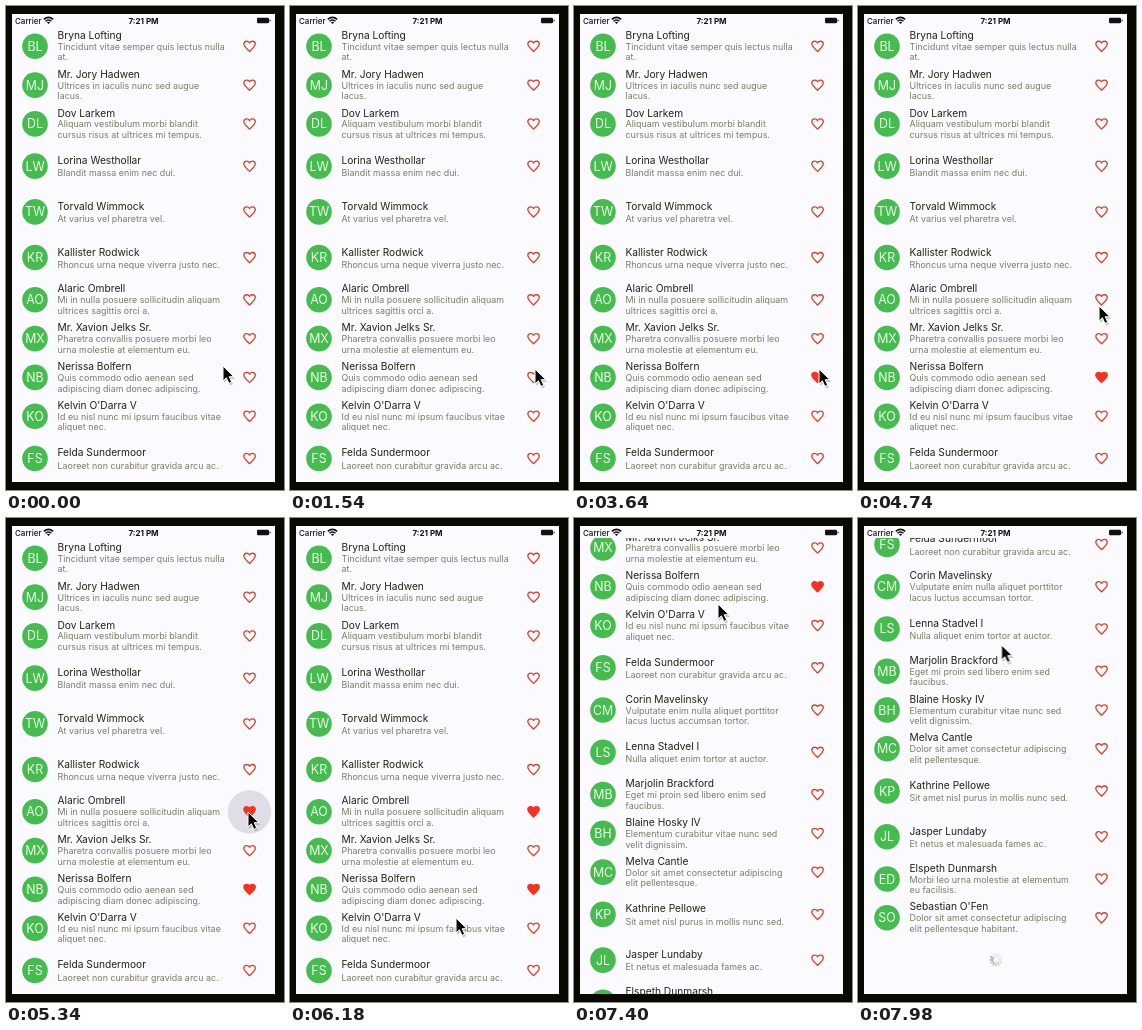
Animation, 278 px wide and 484 px high, one loop 8000 ms. Source, as an HTML page:

```html
<!DOCTYPE html>
<html lang="en">
<head>
<meta charset="utf-8">
<title>Contact list</title>
<style>
  html, body { margin: 0; width: 100%; height: 100%; overflow: hidden; background: #090902; }
  svg { display: block; width: 278px; height: 484px; font-family: Inter, Roboto, sans-serif; }
  .name { font-size: 10.2px; fill: #22220f; }
  .note { font-size: 8.9px; letter-spacing: .03px; fill: #7b7b62; }
  .initials { font-size: 12.4px; fill: #e8ffe0; text-anchor: middle; }
  .status { font-size: 8px; font-weight: 500; fill: #111; }
  .heart { stroke: #db3d26; stroke-width: 2; stroke-linejoin: round; fill: #fafaff; fill-opacity: 0; }
</style>
</head>
<body>
<svg viewBox="0 0 278 484">
  <defs>
    <clipPath id="view"><rect x="6" y="20" width="263" height="456"/></clipPath>
  </defs>
  <rect width="278" height="484" fill="#090902"/>
  <rect x="6" y="8" width="263" height="468" fill="#fafaff"/>
  <g clip-path="url(#view)"><g id="list"></g></g>
  <text class="status" x="9" y="17.6">Carrier</text>
  <g fill="none" stroke="#111" stroke-width="1.5">
    <path d="M37.8 13.4Q42.5 9.3 47.2 13.4M39.5 15.3Q42.5 12.7 45.5 15.3"/>
    <path d="M40.9 16.4Q42.5 15 44.1 16.4L42.5 18Z" fill="#111" stroke="none"/>
  </g>
  <text class="status" x="137.5" y="17.6" text-anchor="middle" style="font-weight:700">7:21 PM</text>
  <rect x="251" y="11.8" width="12" height="5.4" rx="1.3" fill="#111"/>
  <rect x="263.5" y="13.4" width="1" height="2.2" rx=".5" fill="#111"/>
  <g id="pointer">
    <path d="M1 2V17L4.5 14L7 19.5L10 18L7.5 13H12.3Z" fill="#555533" opacity=".3"/>
    <path d="M0 0V15L3.4 11.8L5.9 17.4L8.7 16.1L6.2 10.7H10.9Z" fill="#080808" stroke="#fff" stroke-width="1"/>
  </g>
</svg>
<script>
const LOOP = 8000, START = document.timeline.currentTime || 0;
const HEART = "M12 20C6.5 15 3 12 3 8.5C3 6 5 4 7.5 4C9.3 4 11.2 5.2 12 6.8" +
  "C12.8 5.2 14.7 4 16.5 4C19 4 21 6 21 8.5C21 12 17.5 15 12 20Z";
const people = [
  ["BL", "Bryna Lofting", "Tincidunt vitae semper quis lectus nulla", "at."],
  ["MJ", "Mr. Jory Hadwen", "Ultrices in iaculis nunc sed augue", "lacus."],
  ["DL", "Dov Larkem", "Aliquam vestibulum morbi blandit", "cursus risus at ultrices mi tempus."],
  ["LW", "Lorina Westhollar", "Blandit massa enim nec dui."],
  ["TW", "Torvald Wimmock", "At varius vel pharetra vel."],
  ["KR", "Kallister Rodwick", "Rhoncus urna neque viverra justo nec."],
  ["AO", "Alaric Ombrell", "Mi in nulla posuere sollicitudin aliquam", "ultrices sagittis orci a."],
  ["MX", "Mr. Xavion Jelks Sr.", "Pharetra convallis posuere morbi leo", "urna molestie at elementum eu."],
  ["NB", "Nerissa Bolfern", "Quis commodo odio aenean sed", "adipiscing diam donec adipiscing."],
  ["KO", "Kelvin O'Darra V", "Id eu nisl nunc mi ipsum faucibus vitae", "aliquet nec."],
  ["FS", "Felda Sundermoor", "Laoreet non curabitur gravida arcu ac."],
  ["CM", "Corin Mavelinsky", "Vulputate enim nulla aliquet porttitor", "lacus luctus accumsan tortor."],
  ["LS", "Lenna Stadvel I", "Nulla aliquet enim tortor at auctor."],
  ["MB", "Marjolin Brackford", "Eget mi proin sed libero enim sed", "faucibus."],
  ["BH", "Blaine Hosky IV", "Elementum curabitur vitae nunc sed", "velit dignissim."],
  ["MC", "Melva Cantle", "Dolor sit amet consectetur adipiscing", "elit pellentesque."],
  ["KP", "Kathrine Pellowe", "Sit amet nisl purus in mollis nunc sed."],
  ["JL", "Jasper Lundaby", "Et netus et malesuada fames ac."],
  ["ED", "Elspeth Dunmarsh", "Morbi leo urna molestie at elementum", "eu facilisis."],
  ["SO", "Sebastian O'Fen", "Dolor sit amet consectetur adipiscing", "elit pellentesque habitant."]
];
const likes = { NB: 3180, AO: 5100 };

function add(parent, tag, attrs, text) {
  const el = document.createElementNS("http://www.w3.org/2000/svg", tag);
  for (const key in attrs) el.setAttribute(key, attrs[key]);
  if (text) el.textContent = text;
  return parent.appendChild(el);
}

// steps: [time in ms, styles, easing to the next step]
function play(el, steps, duration = LOOP) {
  const frames = steps.map(([time, style, easing = "linear"]) =>
    ({ offset: time / duration, easing, ...style }));
  el.animate(frames, { duration, iterations: Infinity }).startTime = START;
}
const move = (x, y) => ({ transform: `translate(${x}px, ${y}px)` });

function like(heart, ripple, time) {
  const open = { fill: "#fafaff", fillOpacity: 0, stroke: "#db3d26" };
  const full = { fill: "#f53220", fillOpacity: 1, stroke: "#f53220" };
  play(heart, [[0, open, "steps(1)"], [time + 100, full], [LOOP, full]]);
  const size = (r, fillOpacity) => ({ r: `${r}px`, fillOpacity });
  play(ripple, [[0, size(4, 0)], [time, size(4, 0)], [time + 60, size(8, .28), "ease-out"],
    [time + 260, size(22, .24)], [time + 450, size(22, 0)], [LOOP, size(22, 0)]]);
}

const list = document.getElementById("list");
let bottom = 20.9;
for (const [initials, name, ...notes] of people) {
  const two = notes.length > 1, height = two ? 38.8 : 45.7;
  const row = add(list, "g", { transform: `translate(0 ${bottom + height / 2})` });
  bottom += height;
  add(row, "circle", { cx: 29, r: 12.8, fill: "#46bb50" });
  add(row, "text", { class: "initials", x: 29, y: 4.5 }, initials);
  add(row, "text", { class: "name", x: 51.5, y: two ? -7.4 : -2 }, name);
  notes.forEach((note, i) =>
    add(row, "text", { class: "note", x: 51.5, y: (two ? 3.5 : 10.2) + i * 10.7 }, note));

  const ripple = add(row, "circle", { cx: 243.5, r: 4, fill: "#88889a", "fill-opacity": 0 });
  const heart = add(row, "path", { class: "heart", d: HEART, transform: "translate(235.9 -7.6) scale(.638)" });
  if (likes[initials]) like(heart, ripple, likes[initials]);
}

const spinner = add(list, "g", { transform: `translate(138 ${bottom + 22.7})` });
const TICKS = 12;
const wheel = add(spinner, "g", {});
for (let i = 0; i < TICKS; i++)
  add(wheel, "line", { y1: -3.2, y2: -6, stroke: "#707045", "stroke-width": 1.1, "stroke-linecap": "round",
    opacity: .2 + .7 * Math.max(0, i - 4) / 7, transform: `rotate(${i * 360 / TICKS})` });
play(wheel, [[0, { transform: "rotate(0deg)" }, `steps(${TICKS})`],
  [1000, { transform: "rotate(360deg)" }]], 1000);

play(list, [[0, move(0, 0)], [6780, move(0, 0), "ease-in"], [7020, move(0, -91)],
  [7200, move(0, -197)], [7400, move(0, -302), "cubic-bezier(.2,.45,.5,1)"],
  [7820, move(0, -426)], [LOOP, move(0, -426)]]);

play(document.getElementById("pointer"), [[0, move(217, 360)], [500, move(217, 360), "ease-in-out"],
  [1450, move(245, 363)], [4150, move(245, 363), "ease-in-out"], [4740, move(241, 300), "ease-out"],
  [4950, move(242, 294)], [5800, move(242, 294), "ease-in-out"], [6180, move(166, 400), "ease-in-out"],
  [6700, move(148, 190)], [6800, move(147, 185), "ease-in-out"], [7020, move(144, 86)],
  [7560, move(144, 86), "ease-in-out"], [7980, move(143.5, 127)], [LOOP, move(143.5, 127)]]);
</script>
</body>
</html>
```
